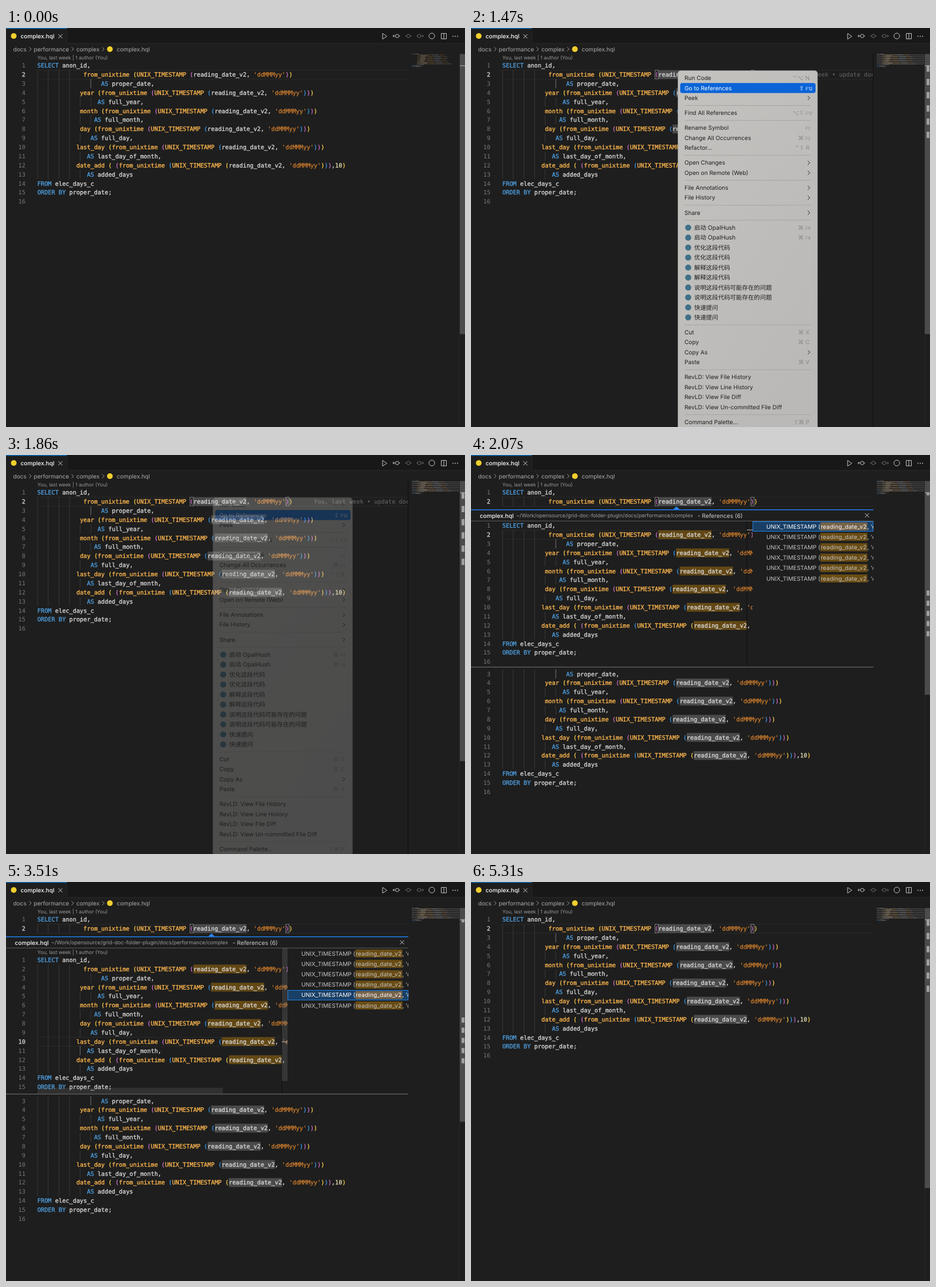
Animation, 802 px wide and 698 px high, one loop 5.52 s. Source, as an HTML page:

```html
<!DOCTYPE html>
<html lang="en">
<head>
<meta charset="utf-8">
<title>Find references</title>
<style>
  html, body { margin: 0; width: 100%; height: 100%; overflow: hidden; background: #1e1e1e; }
  svg { display: block; }
  text { white-space: pre; font-family: Inter, 'Noto Sans CJK SC', 'Noto Sans CJK', sans-serif;
         text-rendering: geometricPrecision; fill: currentColor; }
  .mono { font-family: 'DejaVu Sans Mono', monospace; }
  .code tspan { fill: currentColor; stroke: currentColor; stroke-width: .32px; }
  .num { color: #73797f; text-anchor: end; }
  .num.on { color: #d6d6d6; stroke: #d6d6d6; stroke-width: .3px; }
  .icon { fill: none; stroke: currentColor; stroke-width: 1; }
  .item { color: #202020; }
  .item .key { color: #8b8a88; }
  .item .bar { fill: none; }
  .item.on, .item.on .key { color: #fff; }
  .item.on .bar { fill: #0a64d8; }
  .row { color: #c4c4c4; }
  .row .bg { fill: none; }
  .row .match { fill: #694c14; }
  .row .word { letter-spacing: .2px; }
  .row.hover .bg { fill: #2a2d2e; }
  .row.on { color: #fff; }
  .row.on .bg { fill: #193f66; stroke: #1f80e0; }
  .row.on .match { fill: #75634a; }
</style>
</head>
<body>
<svg id="stage" width="802" height="698" viewBox="0 0 802 698"></svg>
<script>
const LOOP = 5520;
const LEFT = 54.8, CHAR = 6.195, LINE = 15.87, MONO = 10.29;
const UI = 10.1;
const WORD = 'reading_date_v2';
const PARENS = ['#ffd24a', '#d570d0', '#3a9df0'];
const LINES = `SELECT anon_id,
             from_unixtime (UNIX_TIMESTAMP (reading_date_v2, 'ddMMMyy'))
                  AS proper_date,
            year (from_unixtime (UNIX_TIMESTAMP (reading_date_v2, 'ddMMMyy')))
                 AS full_year,
            month (from_unixtime (UNIX_TIMESTAMP (reading_date_v2, 'ddMMMyy')))
                AS full_month,
            day (from_unixtime (UNIX_TIMESTAMP (reading_date_v2, 'ddMMMyy')))
               AS full_day,
           last_day (from_unixtime (UNIX_TIMESTAMP (reading_date_v2, 'ddMMMyy')))
              AS last_day_of_month,
           date_add ( (from_unixtime (UNIX_TIMESTAMP (reading_date_v2, 'ddMMMyy'))),10)
              AS added_days
FROM elec_days_c
ORDER BY proper_date;
`.split('\n');

// Markup helpers; y is always the vertical centre of a text.
const rect = (x, y, w, h, fill, more = '') =>
  `<rect x="${x}" y="${y}" width="${w}" height="${h}" ${fill ? `fill="${fill}"` : ''} ${more}/>`;
const text = (x, y, s, color, size = UI, more = '') =>
  `<text x="${x}" y="${y + size * .355}" font-size="${size}" ${color ? `style="color:${color}"` : ''} ${more}>${s}</text>`;
const icon = (d, color = '#c5c5c5', more = '') =>
  `<path class="icon" d="${d}" style="color:${color}" ${more}/>`;
const group = (id, body, more = '') => `<g id="${id}" ${more}>${body}</g>`;
const chevron = (x, y, color) => icon(`M${x - 2} ${y - 3.5}l3.5 3.5l-3.5 3.5`, color);
const cross = (x, y) => icon(`M${x - 3.5} ${y - 3.5}l7 7m0 -7l-7 7`, '#d0d0d0');
const colX = col => LEFT + col * CHAR;

function tokenize(line) {
  let depth = 0;
  const pattern = /'[^']*'|\w+(?= \()|\b(?:SELECT|AS|FROM|ORDER BY)\b|[()]|\b\d+\b|\w+|[,;]| +/g;
  return [...line.matchAll(pattern)].map(({ 0: s, index }) => {
    let color = '#d8d8d8';
    if (s[0] === "'") color = '#c97a2c';
    else if (s === '(') color = PARENS[depth++ % 3];
    else if (s === ')') color = PARENS[--depth % 3];
    else if (/^\d+$/.test(s)) color = '#e3dcae';
    else if (/^(SELECT|AS|FROM|ORDER BY)$/.test(s)) color = '#4f9fe0';
    else if (line.startsWith(' (', index + s.length)) color = '#ffb84f';
    return { s, color, col: index };
  });
}

const indentOf = i => Math.max(0, LINES[i].search(/\S/));
function guideCols(i) {
  const n = indentOf(i);
  if (!n) return [];
  const cols = [0, 3, 6, 9];
  if (n >= 14 && n < 18) cols.push(12);
  if (n >= 16) cols.push(15);
  return cols;
}

// Lines from..to (zero based); centre(i) gives the height of each line.
function codeBlock(from, to, centre, mark, markClass) {
  let out = '';
  for (let i = from; i <= to; i++) {
    const y = centre(i), line = LINES[i], at = line.indexOf(WORD);
    out += guideCols(i).map(c => rect(colX(c), y - LINE / 2, .8, LINE, '#404040')).join('');
    if (at >= 0) out += rect(colX(at), y - 7.7, WORD.length * CHAR, 15.4, mark, `class="${markClass}"`);
    out += text(34, y, i + 1, '', MONO, `class="mono num" data-line="${i + 1}"`);
    const spans = tokenize(line).filter(k => k.s.trim() || k.col)
      .map(k => `<tspan style="color:${k.color}">${k.s}</tspan>`).join('');
    out += text(colX(indentOf(i)), y, spans, '', MONO, 'class="mono code"');
  }
  return out;
}
const activeFrame = (y, right) =>
  rect(LEFT, y - 8, right - LEFT, .9, '#2b2b2b') + rect(LEFT, y + 7.6, right - LEFT, .9, '#2b2b2b');
const lens = y => text(LEFT, y, 'You, last week | 1 author (You)', '#999', 8.65);

function topBar() {
  const commit = (x, color, tails) => icon(`M${x - 3} 14a3 3 0 1 0 6 0a3 3 0 1 0 -6 0${tails}`, color);
  return rect(0, 0, 802, 27, '#181818') + rect(0, 26.5, 802, 1, '#2b2b2b') +
    rect(0, 0, 106, 28, '#1e1e1e') + rect(0, 0, 106, 1.2, '#0078d4') + rect(106, 0, .8, 27, '#2b2b2b') +
    '<circle cx="13.5" cy="14" r="5" fill="#f0cf2c"/><circle cx="181.5" cy="37" r="5" fill="#f0cf2c"/>' +
    text(25.5, 14, 'complex.hql', '#fff', UI, 'font-weight="500"') + cross(95, 14.5) +
    text(12.5, 37, 'docs', '#ababab') + chevron(42.5, 37, '#999') +
    text(48.5, 37, 'performance', '#ababab') + chevron(116.5, 37, '#999') +
    text(123, 37, 'complex', '#ababab') + chevron(170, 37, '#999') +
    text(193.5, 37, 'complex.hql', '#ababab') +
    icon('M658 9.5l7.5 5l-7.5 5z') +
    commit(683.5, '#c5c5c5', 'M680 14h-4m2 -2.2l-2 2.2l2 2.2M686.5 14h2') +
    commit(703, '#666', 'M697 14h3m6 0h3') +
    commit(722, '#666', 'M717 14h2m6 0h4.5m-2 -2.2l2 2.2l-2 2.2') +
    '<circle cx="744" cy="14" r="5" fill="none" stroke="#c5c5c5"/>' +
    icon('M760.5 9.5h9v9.5h-9zM765 9.5v9.5') +
    [781, 785, 789].map(x => `<circle cx="${x}" cy="14.5" r=".9" fill="#c5c5c5"/>`).join('');
}

function minimap() {
  let words = '', bands = '';
  LINES.forEach((line, i) => {
    const y = 45.1 + i * 1.56;
    if (line.includes(WORD)) bands += rect(709, y - .1, 83, 1.1, '#767676', 'opacity=".65"');
    for (const k of tokenize(line))
      if (k.s.trim()) words += rect(709 + k.col * .79, y, k.s.length * .79, .9, k.color, 'opacity=".4"');
  });
  return group('bands', bands) + words;
}

const MENU = [
  ['Run Code|⌃⌥ N', 'Go to References|⇧ F12', 'Peek|>'],
  ['Find All References|⌥⇧ F12'],
  ['Rename Symbol|F2', 'Change All Occurrences|⌘ F2', 'Refactor...|⌃⇧ R'],
  ['Open Changes|>', 'Open on Remote (Web)|>'],
  ['File Annotations|>', 'File History|>'],
  ['Share|>'],
  ['启动 OpalHush|⌘ F9', '优化这段代码', '解释这段代码', '说明这段代码可能存在的问题', '快速提问'].flatMap(s => [s, s]),
  ['Cut|⌘ X', 'Copy|⌘ C', 'Copy As|>', 'Paste|⌘ V'],
  ['File History', 'Line History', 'File Diff', 'Un-committed File Diff'].map(s => 'RevLD: View ' + s),
  ['Command Palette...|⇧⌘ P']
];

function shortcut(key, y) {
  if (!key) return '';
  if (key === '>') return chevron(590.5, y, 'currentColor');
  const [mods, letter] = key.includes(' ') ? key.split(' ') : ['', key];
  const small = letter.length > 1;
  const end = letter === 'F12' ? 597 : small ? 593.5 : 591.5;
  const size = small ? 7.6 : UI;
  const span = `<tspan font-family="DejaVu Sans, sans-serif" font-size="10">${mods}</tspan> ` +
    `<tspan font-size="${size}">${letter}</tspan>`;
  return text(end, y, span, '', 10, 'class="key" text-anchor="end"');
}

function menu() {
  let y = 87.6;
  let out = rect(361.5, 74.5, 244, 640, 'url(#glass)', 'rx="5" stroke="#8a8a88" stroke-width=".6"');
  MENU.forEach((items, g) => {
    if (g) {
      out += rect(373, y - 4.8, 221, .9, '#a3a2a0');
      y += 8.7;
    }
    for (const item of items) {
      const [label, key] = item.split('|'), bot = g === 6;
      out += '<g class="item">' + rect(365.5, y - 8.7, 236.5, 17.4, '', 'rx="3.5" class="bar"') +
        (bot ? `<circle cx="379.5" cy="${y}" r="5.3" fill="#3f7088"/>` : '') +
        text(bot ? 390 : 373, y, label, '', bot ? 10.45 : UI) + shortcut(key, y) + '</g>';
      y += 17.45;
    }
  });
  return out;
}

function peek() {
  const centre = i => 123.6 + i * LINE;
  let rows = '';
  for (let i = 0; i < 6; i++) {
    const y = 125 + i * 18.2;
    rows += '<g class="row">' + rect(492.5, Math.round(y) - 8.5, 210, 17, '', 'class="bg"') +
      rect(610.5, y - 7, 82, 14, '', 'class="match"') + text(516, y, 'UNIX_TIMESTAMP (') +
      text(611, y, WORD, '', UI, 'class="word"') + text(692.5, y, ", 'ddMMMyy'") + '</g>';
  }
  return rect(0, 95, 703, 276, '#1e1e1e') +
    '<path d="M353 95.5l6 -5.5l6 5.5z" fill="#2f86e8"/>' + rect(0, 95, 703, 1.6, '#1f78e6') +
    text(15.5, 106, 'complex.hql', '#fff', UI, 'font-weight="500"') +
    text(79, 106, '~/Work/opensource/grid-doc-folder-plugin/docs/performance/complex', '#9d9d9d', 9.1) +
    text(396, 106, '- References (6)', '#d0d0d0', 10.2) +
    rect(684, 97.5, 16.5, 16.5, '#363737', 'rx="3" id="closeHover"') + cross(692, 105.5) +
    rect(0, 115, 703, 1, '#5a5a5a') +
    '<g clip-path="url(#previewClip)">' +
      group('preview', group('previewLens', lens(110)) +
        group('previewActive', activeFrame(123.6, 482)) +
        codeBlock(0, 15, centre, '#634814', 'ref') +
        rect(0, 0, .9, LINE, '#757575', 'id="previewGuide"')) +
      rect(481.5, 116, .9, 254, '#0c0c0c') +
      group('sliders', rect(482, 116, 10, 232, '#797979', 'opacity=".25" id="vSlider"') +
        rect(55, 360, 324, 10, '#797979', 'opacity=".2"')) +
      rect(482, 0, 10, 1.2, '#a8a8a8', 'id="previewTick"') +
    '</g>' +
    `<g clip-path="url(#listClip)">${rows}</g>` + rect(0, 370.5, 703, 1, '#7a7a7a');
}

function rulerMarks(ys, heights) {
  return ys.map((y, i) => rect(796, y - heights[i] / 2, 5, heights[i], '#a0a0a0')).join('');
}
const fiveFrom = (y, pitch) => Array.from({ length: 5 }, (_, i) => y + i * pitch);

const mainY = i => 65.6 + i * LINE;
const stage = document.getElementById('stage');
stage.innerHTML = `<defs>
  <linearGradient id="glass" x2=".6" y2="1"><stop stop-color="#c3c2bf"/><stop offset="1" stop-color="#bab9b7"/></linearGradient>
  <clipPath id="previewClip"><rect y="116" width="492" height="254"/></clipPath>
  <clipPath id="listClip"><rect x="492" y="115" width="211" height="255"/></clipPath>
  <clipPath id="editorClip"><rect y="45" width="703" height="653"/></clipPath>
</defs>` +
  rect(0, 0, 802, 698, '#1e1e1e') + topBar() + lens(51.7) + activeFrame(mainY(1), 703) +
  codeBlock(0, 1, mainY, '#4a4a4a', 'hl') +
  group('rest', codeBlock(2, 15, mainY, '#4a4a4a', 'hl') +
    rect(colX(15), mainY(2) - LINE / 2, .9, LINE, '#757575')) +
  group('brackets', [43, 70].map(c =>
    rect(colX(c) + .4, mainY(1) - 7.5, CHAR - .4, 15, 'none', 'stroke="#8c8c8c" stroke-width=".9"')).join('')) +
  group('blame', text(538, mainY(1), 'You, last week • update docs', '#686868', MONO, 'class="mono"'),
    'clip-path="url(#editorClip)"') +
  rect(358.3, 74, 1.5, 15.5, '#c8c8c8', 'id="caret"') +
  rect(702, 45, 1, 653, '#0d0d0d', 'id="edge"') + minimap() +
  rect(792.3, 45, .8, 653, '#2c2c2c') + rect(793, 45.5, 9, 490, '#4b4b4b', 'id="mainSlider"') +
  rect(793, 65.3, 9, 1.3, '#9c9c9c') +
  group('marks', rulerMarks([71, ...fiveFrom(94.5, 23.1)], Array(6).fill(11))) +
  group('peekMarks', rulerMarks([68, ...fiveFrom(241.5, 17.8)], [5, 9, 9, 9, 9, 9])) +
  group('peek', peek()) + group('menu', menu());

const el = {};
stage.querySelectorAll('[id]').forEach(e => el[e.id] = e);
const items = stage.querySelectorAll('.item');
const rowEls = stage.querySelectorAll('.row');
const previewNums = el.preview.querySelectorAll('.num');
const highlights = stage.querySelectorAll('.hl');
stage.querySelector('.num[data-line="2"]').classList.add('on');

// Timelines: [ms, value]
const MENU_HOVER = [[0, -1], [1080, 2], [1110, 9], [1140, 17], [1350, 10], [1410, 4], [1470, 1], [1740, -1], [1770, 1]];
const MENU_ALPHA = [[1770, 1], [1800, .65], [1860, .3], [1950, 0]];
const ROW_HOVER = [[0, -1], [2700, 5], [2850, 4], [2940, 3], [3360, 4], [3750, 5], [4320, -1]];
const ROW_PICK = [[0, 0], [3030, 3], [3420, 4], [3840, 5]];
const SLIDERS = [[2070, 0], [2160, 1]];
const SCROLL = [[3840, 0], [3930, 14], [4050, 22]];
const PEEK_OPEN = 1950, LENS_IN = 2100, PEEK_CLOSE = 4860;

const step = (track, t) => track.reduce((v, [at, next]) => t >= at ? next : v, track[0][1]);
function ramp(track, t) {
  if (t <= track[0][0]) return track[0][1];
  const i = track.findIndex(([at]) => at >= t);
  if (i < 0) return track[track.length - 1][1];
  const [t0, a] = track[i - 1], [t1, b] = track[i];
  return a + (b - a) * (t - t0) / (t1 - t0);
}
const within = (t, from, to) => t >= from && t < to;
const show = (e, on) => e.style.display = on ? '' : 'none';
const moveY = (e, y) => e.setAttribute('transform', `translate(0 ${y})`);

function render(t) {
  const open = within(t, PEEK_OPEN, PEEK_CLOSE);
  const marked = t >= 780;
  highlights.forEach(e => show(e, marked));
  show(el.bands, marked);
  show(el.marks, marked && !open);
  show(el.peekMarks, open);
  show(el.brackets, t >= 510);
  show(el.blame, within(t, 540, PEEK_OPEN));
  show(el.edge, within(t, 540, PEEK_OPEN));
  show(el.caret, within(t, 510, 1350) || within(t, PEEK_CLOSE, 5310));
  moveY(el.rest, open ? 285.6 : 0);
  el.mainSlider.setAttribute('height', open ? 374 : 490);

  show(el.menu, within(t, 540, PEEK_OPEN));
  el.menu.style.opacity = ramp(MENU_ALPHA, t);
  const hover = step(MENU_HOVER, t);
  items.forEach((e, i) => e.classList.toggle('on', i === hover));

  show(el.peek, open);
  if (!open) return;
  const pick = step(ROW_PICK, t), rowHover = step(ROW_HOVER, t);
  rowEls.forEach((e, i) => {
    e.classList.toggle('on', i === pick);
    e.classList.toggle('hover', i === rowHover && i !== pick);
  });
  const active = 2 * pick + 2;
  const scroll = ramp(SCROLL, t);
  const shift = (t >= LENS_IN ? 12.7 : 0) - scroll;
  const activeY = (active - 1) * LINE;
  moveY(el.preview, shift);
  show(el.previewLens, t >= LENS_IN);
  moveY(el.previewActive, activeY);
  previewNums.forEach((e, i) => e.classList.toggle('on', i + 1 === active));
  el.previewGuide.setAttribute('x', colX(active === 2 ? 15 : 12));
  el.previewGuide.setAttribute('y', 123.6 + activeY + LINE / 2);
  el.previewTick.setAttribute('y', pick ? 123.6 + activeY + shift : t >= LENS_IN ? 141.5 : 130.5);
  el.sliders.style.opacity = ramp(SLIDERS, t);
  moveY(el.vSlider, scroll * .96);
  show(el.closeHover, t >= 4530);
}

const start = performance.now();
function tick() {
  render((performance.now() - start) % LOOP);
  requestAnimationFrame(tick);
}
tick();
</script>
</body>
</html>
```
